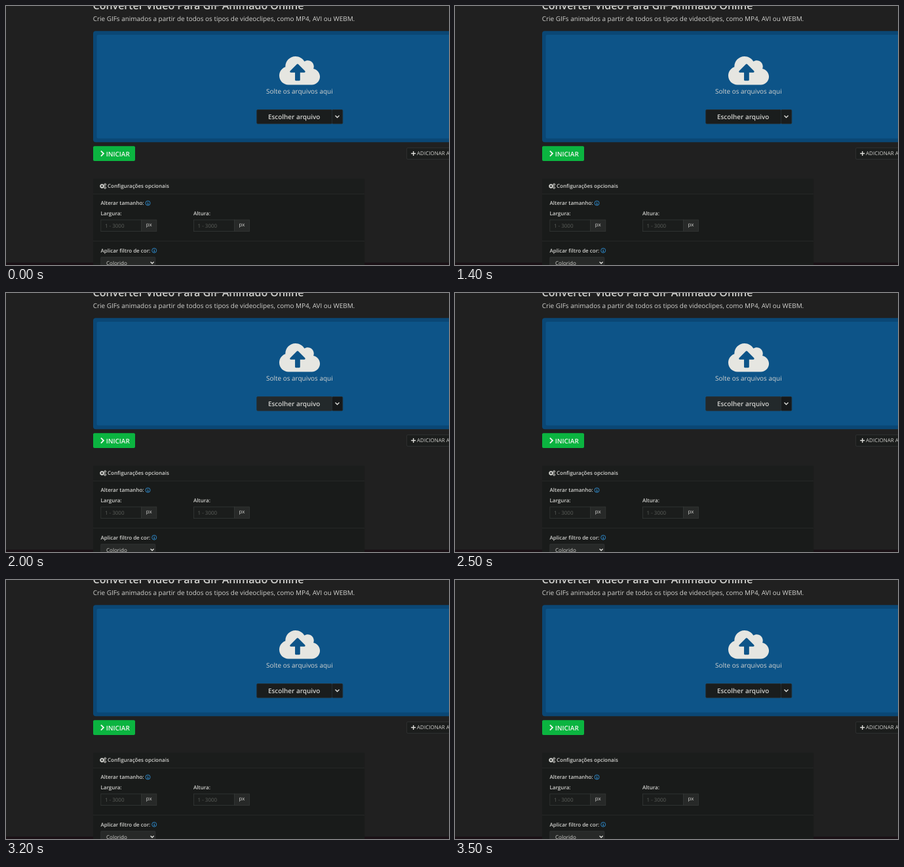
Write an HTML page that moves like this. It is 676 by 396 pixels and loops after 4000 ms.

```html
<!DOCTYPE html>
<html lang="pt">
<head>
<meta charset="utf-8">
<title>Converter vídeo</title>
<style>
  html, body { margin: 0; width: 100%; height: 100%; overflow: hidden; background: #202020; }
  svg { display: block; width: 676px; height: 396px; }
  text {
    font: 8px "Open Sans", "Noto Sans", "Noto Sans CJK SC", sans-serif;
    fill: #d2d2cf;
    text-rendering: geometricPrecision;
  }
  .body { font-size: 9.95px; }
  .label { font-weight: 600; }
  .button { font-size: 9.95px; font-weight: 600; }
  .title { font-size: 16px; font-weight: 600; }
  .hint { fill: #5c5f5b; }
  .panel { fill: #191b1a; }
  .box { fill: #1b1d1c; stroke: #343736; stroke-width: .8; }
  .addon { fill: #272928; stroke: #343736; stroke-width: .8; }
  .rule { stroke: #2b2d2b; stroke-width: .8; }
  .line { fill: none; stroke: #dededa; stroke-width: 1.4; }
  .start text { fill: #f1f5ef; }
  .start .line { stroke: #f1f5ef; stroke-width: 1.9; }
  .menu text { fill: #bcbcba; }
</style>
</head>
<body>
<svg viewBox="0 0 676 396">
  <defs>
    <g id="info" fill="none" stroke="#2f8fd4" stroke-width=".9">
      <circle r="3.5"/>
      <path d="M-.7-.4H.2V1.7M-.9 1.8H1M0-2V-1.2"/>
    </g>
    <g id="gear" fill="none" stroke="#d8d8d4">
      <circle r="2.2" stroke-width="1.6"/>
      <circle r="3.3" stroke-width="1" stroke-dasharray="1.5 1.092"/>
    </g>
    <g id="field">
      <rect class="box" x=".4" y=".4" width="62" height="17.6"/>
      <rect class="addon" x="62.4" y=".4" width="23" height="17.6"/>
      <text class="hint" x="6.5" y="12.2">1 - 3000</text>
      <text x="69.4" y="10.8">px</text>
    </g>
  </defs>

  <rect y="392.4" width="676" height="4" fill="#1a1015"/>
  <text class="title" x="132.5" y="5">Converter Vídeo Para GIF Animado Online</text>
  <text class="body" x="132.7" y="23.3">Crie GIFs animados a partir de todos os tipos de videoclipes, como MP4, AVI ou WEBM.</text>

  <!-- drop zone -->
  <rect x="133" y="38.3" width="560" height="170" rx="4" fill="#0a4775"/>
  <rect x="138.5" y="44" width="560" height="158.5" rx="2" fill="#0d5488"/>
  <g transform="translate(417 73.9) scale(.097)">
    <path fill="#e6e6e1" d="M537.6 226.6c4-11 6.4-22 6.4-34.6 0-53-43-96-96-96-20 0-38 6-53.3 16.2C367 64 315 32 256 32c-88 0-160 72-160 160v8C40 220 0 273 0 336c0 79.5 64.5 144 144 144h368c71 0 128-57 128-128 0-62-44-114-102.4-125.4z"/>
    <path fill="#0d5488" d="M393 288H328v112q0 16-16 16h-48q-16 0-16-16V288h-65c-14 0-21-17-11-27l105-105q11-9 22 0l105 105c10 10 3 27-11 27z"/>
  </g>
  <text class="body" x="397.1" y="134.4">Solte os arquivos aqui</text>
  <g stroke="#283034" stroke-width=".8">
    <rect id="choose" x="382.7" y="158.5" width="114.8" height="21.6" rx="1.5" fill="#1a1d1d"/>
    <rect id="more" x="497.5" y="158.5" width="16.3" height="21.6" rx="1.5" fill="#1a1d1d"/>
  </g>
  <text class="button" x="399.9" y="172.5">Escolher arquivo</text>
  <path class="line" d="M502.5 167.5l3 3 3-3"/>

  <!-- actions -->
  <g class="start">
    <rect x="133" y="214.2" width="64" height="22.8" rx="2" fill="#0bb440"/>
    <path class="line" d="M144.9 221.6l4 4-4 4"/>
    <text class="button" x="152.7" y="229.5">INICIAR</text>
  </g>
  <rect class="box" x="611.6" y="216.9" width="80" height="17.4" rx="1.5"/>
  <path class="line" d="M618.2 225.5h7M621.7 222v7"/>
  <text x="627" y="228.4">ADICIONAR A</text>

  <!-- options -->
  <rect class="panel" x="133" y="264" width="414.2" height="140" rx="1.5"/>
  <rect x="133" y="264" width="414" height="23" fill="#1b1d1c"/>
  <path class="rule" d="M133 287.4H547M133 359.4H547"/>
  <use href="#gear" transform="translate(146.5 275.4) scale(.95)"/>
  <use href="#gear" transform="translate(151.2 273) scale(.55)"/>
  <use href="#gear" transform="translate(151.2 277.8) scale(.55)"/>
  <text class="label" x="155" y="278.2">Configurações opcionais</text>
  <text class="label" x="144.5" y="304.3">Alterar tamanho:</text>
  <use href="#info" x="216.5" y="301.4"/>
  <text class="label" x="144.5" y="319.7">Largura:</text>
  <text class="label" x="286" y="319.7">Altura:</text>
  <use href="#field" x="144.4" y="326.6"/>
  <use href="#field" x="286" y="326.6"/>
  <text class="label" x="144.5" y="376.7">Aplicar filtro de cor:</text>
  <use href="#info" x="226.2" y="373.8"/>
  <rect class="addon" x="144.8" y="384" width="83" height="18" rx="1"/>
  <text x="153" y="396.2">Colorido</text>
  <path class="line" d="M220.6 391.2l2.5 2.5 2.5-2.5"/>

  <g class="menu" id="menu" opacity="0">
    <rect x="599" y="-2" width="80" height="131.3" fill="#1a1b1c" stroke="#2a2c2d" stroke-width=".6"/>
    <text x="616.2" y="21.5">English</text>
    <text x="616.2" y="44.2">Français</text>
    <text x="616.2" y="66.6">हिन्दी</text>
    <text x="616.2" y="89.8">中文 (简体)</text>
    <text x="616.2" y="112.4">Deutsch</text>
  </g>
</svg>
<script>
  const LOOP = 4000;

  // Each step is [ms, value] and holds until the next one.
  function play(id, prop, steps) {
    const frames = steps.map(([ms, value]) =>
      ({ offset: ms / LOOP, [prop]: value, easing: "steps(1, end)" }));
    frames.push({ offset: 1, [prop]: steps.at(-1)[1] });
    document.getElementById(id).animate(frames, { duration: LOOP, iterations: Infinity });
  }

  const idle = "#1a1d1d";
  play("choose", "fill", [[0, idle], [1700, "#1f2425"], [1800, "#23292b"], [2800, idle]]);
  play("more", "fill", [[0, idle], [1700, "#181b1b"], [1800, "#16191a"], [2800, idle]]);
  play("menu", "opacity", [[0, 0], [3400, 1], [3500, 0]]);
</script>
</body>
</html>
```
